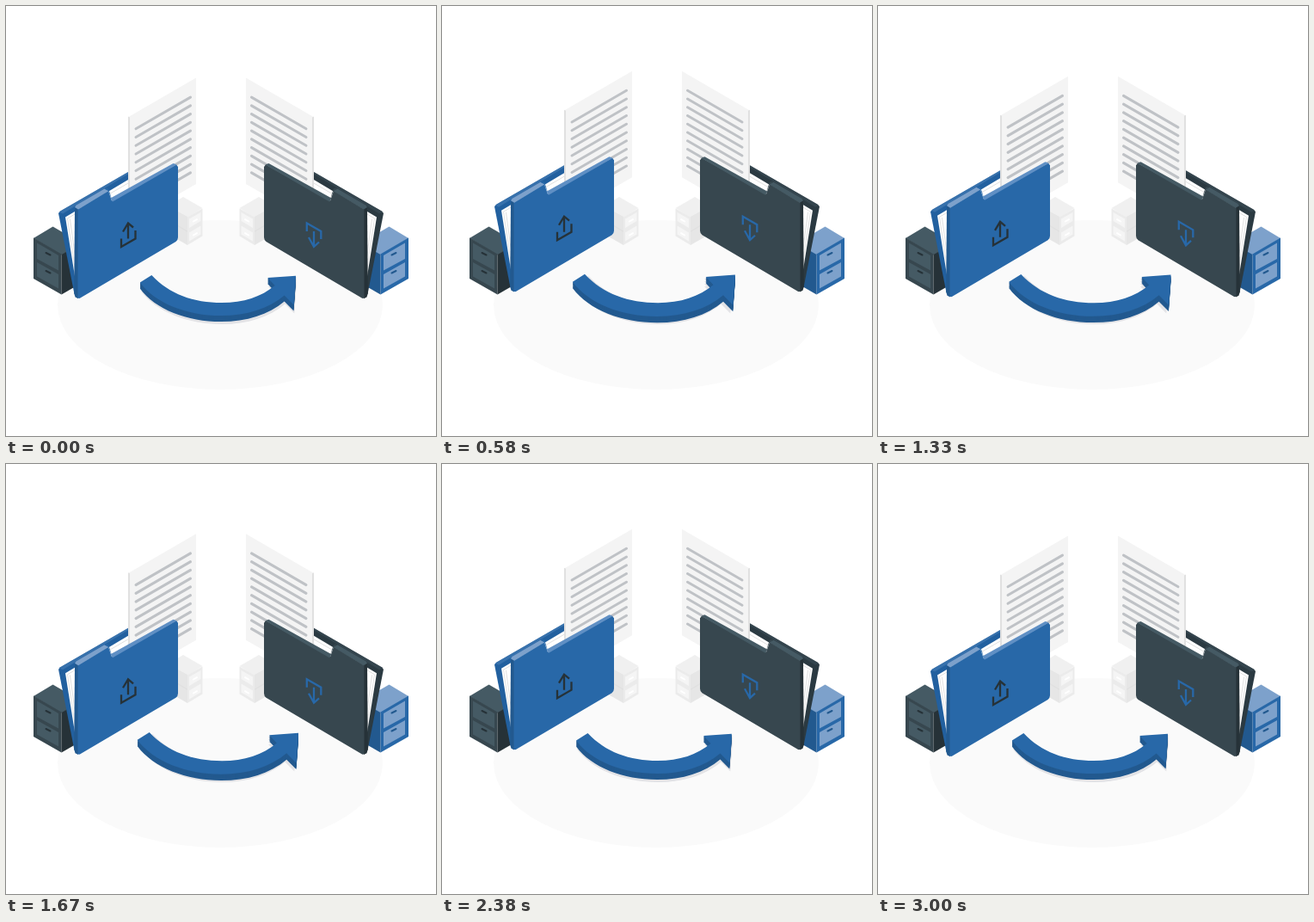
An HTML page that plays this animation: 500x500 px, repeating every 3040 ms.

```html
<!DOCTYPE html>
<html lang="en">
<head>
<meta charset="utf-8">
<title>File transfer</title>
<style>
html, body { margin: 0; width: 100%; height: 100%; overflow: hidden; background: #fff; }
svg { display: block; width: 100vw; height: 100vh; }
.blue { --main: #2868a8; --dark: #22598f; --light: #7da1cb; --edge: #5f8fc4; --back: #22609f; }
.slate { --main: #37474f; --dark: #263238; --light: #455a64; --edge: #455a64; --back: #2b3a42; }
.main { fill: var(--main); }
.dark { fill: var(--dark); }
.light { fill: var(--light); }
.edge { fill: var(--edge); }
.back { fill: var(--back); }
.line { fill: none; stroke-linecap: round; stroke-linejoin: round; }
.icon { fill: none; stroke-width: 2.3; }
</style>
</head>
<body>
<svg viewBox="0 0 500 500">
  <defs>
    <g id="cabinet">
      <path class="light" d="M32 270 54.5 256.5 88 276 64.500 289.500z"/>
      <path class="main" d="M32 269.500 64.500 288.500V335.500L32 317z"/>
      <path class="dark" d="M64.500 289 88 275.500V322L64.500 335.500z"/>
      <path class="light" d="M36 275.500 61 290V307.500L36 294zM36 298 61 312V328.500L36 314.500z"/>
      <path class="line" stroke="var(--dark)" stroke-width="2" d="M46.500 287 51.500 289.500M46.500 308 51.500 310.500"/>
    </g>
    <g id="pale">
      <path fill="#f0f0f0" d="M183 236 206 222 228.500 235 211 246z"/>
      <path fill="#e6e6e6" d="M183 230 211 245V278L183 262z"/>
      <path fill="#ebebeb" d="M211 245.500 228.500 235.500V267.500L211 278z"/>
      <path fill="#f5f5f5" d="M213 247.500 226.500 240V250L213 258zM213 263.500 226.500 255.500V265.500L213 273.500z"/>
      <path fill="#e0e0e0" d="M196 252.500 211 261.500V263L196 254z"/>
      <path class="line" stroke="#fff" stroke-width="2" d="M218 250.500 222 248.200M218 266.500 222 264.200"/>
    </g>
    <g id="folder">
      <path class="back" d="M61 241 63 238.500 142 193V225L84 338 79.500 335z"/>
      <path class="edge" opacity=".35" d="M62 239.500 142 193V195.500L66 241.500z"/>
      <path fill="#fff" d="M69 245.500 142 202V226L84 320 80 314z"/>
      <path class="line" stroke="#d8d8d8" stroke-width=".8" d="M81 311 71.500 247 142 206M81 296 74.500 248"/>
      <path fill="#f4f4f4" d="M142.500 129 221 83.500V207L142.500 252z"/>
      <path fill="#e0e0e0" d="M142 128.500 144 129.500V252H142z"/>
      <g class="line lines" stroke="#bfc2c6" stroke-width="3"></g>
      <path class="dark" d="M80 234.500 84 236V340.300L80.500 338.500 79.200 334z"/>
      <path class="main" d="M83.500 236.500 119 215 123 226.500 198 184.500 200 187V269Q200 272 197.500 274L85.500 340 83.500 339.500z"/>
      <path class="light" d="M80 234 81.500 231.800 114.500 212.500 119.500 215 84 236.500z"/>
      <path class="main" d="M114.500 212.500Q117.500 210.800 119.300 213L123.500 226 119 215z"/>
      <path class="edge" d="M121.500 223.500 194.500 183 198.500 184.500 124 227.500z"/>
    </g>
    <path id="arrow" d="M156 321.500 169.500 313C190 335 218 345 251 345 276 345 297 338 312.500 325L304 316 336.800 313.700 334.300 347.500 323.500 336.500C305 352 280 360 250 360 211 360 174 346 156 321.500z"/>
  </defs>

  <ellipse cx="249" cy="347.500" rx="189" ry="98.500" fill="#fafafa"/>
  <use href="#pale"/>
  <use href="#pale" transform="matrix(-1 0 0 1 500 0)"/>
  <use href="#cabinet" class="slate"/>
  <use href="#cabinet" class="blue" transform="matrix(-1 0 0 1 500 0)"/>

  <g id="shadow" fill="#e3e3e6"></g>
  <g id="beat" class="blue">
    <g id="depth" class="dark"></g>
    <use href="#arrow" class="main"/>
  </g>

  <g id="float">
    <use href="#folder" class="blue"/>
    <use href="#folder" class="slate" transform="matrix(-1 0 0 1 500 0)"/>
    <path class="icon" stroke="#263238" d="M134 270.500V280L150.500 270.500V261M142 270.500V253M136 262.500 142 252.500 148 257.500"/>
    <path class="icon" stroke="#2868a8" d="M349.800 262V252.500L366.300 262V271M358 262V280M352 269 358 280 364 274.500"/>
  </g>
</svg>
<script>
const $ = s => document.querySelector(s);
const fill = (el, n, make) => el.innerHTML = Array.from({ length: n }, (_, i) => make(i)).join('');

fill($('.lines'), 10, i => `<path d="M151 ${142.800 + i * 9.75}l63.500-36.700"/>`);
fill($('#depth'), 7, i => `<use href="#arrow" y="${7 - i}"/>`);
fill($('#shadow'), 4, i => `<use href="#arrow" x="1" y="${1 + i * 3}"/>`);

const LOOP = 3040, FPS = 24, PHASE = 20;
const tent = (x, peak, end) => Math.max(0, x < peak ? x / peak : (end - x) / (end - peak));

function draw(now) {
  const step = Math.floor((now % LOOP + 5) * FPS / 1000);
  const t = step * 1000 / FPS + PHASE;
  const lift = 10 * tent(t % 1500, 750, 1500);
  $('#float').setAttribute('transform', `translate(0 ${0.27 - lift})`);

  // Two beats of one second, then a second of rest.
  const beat = t % 3000;
  const scale = 1 + (beat < 2000 ? 0.058 * tent(beat % 1000, 495, 1000) : 0);
  $('#beat').setAttribute('transform', `translate(246.500 340) scale(${scale}) translate(-246.500 -340)`);
}

const start = performance.now();
function tick() {
  draw(performance.now() - start);
  requestAnimationFrame(tick);
}
tick();
</script>
</body>
</html>
```
